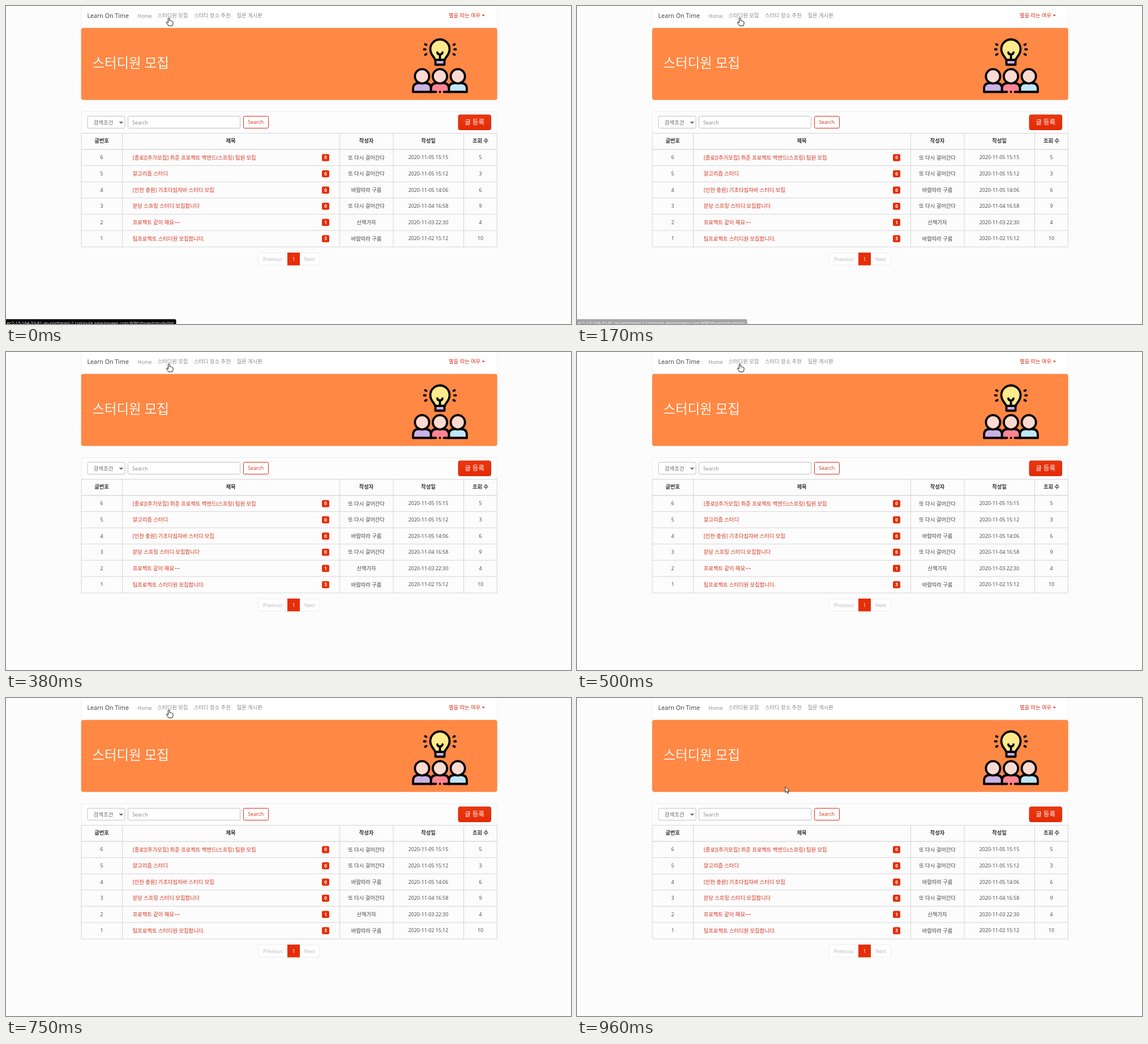
An HTML page for the animation above (1000 ms loop, 998 by 561 pixels).

```html
<!DOCTYPE html>
<html lang="ko">
<head>
<meta charset="utf-8">
<style>
  html, body { margin: 0; width: 100%; height: 100%; overflow: hidden; background: #fcfcfc; }
  svg { display: block; }
  text { font-family: "Open Sans", "Noto Sans CJK KR", "Noto Sans CJK", sans-serif; white-space: pre; }
</style>
</head>
<body>
<svg id="stage" width="998" height="561" viewBox="0 0 998 561">
  <defs>
    <linearGradient id="btn" x2="0" y2="1">
      <stop stop-color="#ea370f"/><stop offset="1" stop-color="#e42b07"/>
    </linearGradient>
  </defs>
  <g id="page"></g>
  <g id="icon" transform="translate(766.5 0)" stroke="#000" stroke-width="3.8" stroke-linecap="round" stroke-linejoin="round">
    <path d="M-8.5 95C-9 90-17 87-17 76A17 17 0 0 1 17 76C17 87 9 90 8.5 95Z" fill="#ffea8c"/>
    <path d="M-8 95H8V103.500H-8Z" fill="#c9b2e6"/>
    <path d="M-4.500 82Q-4 85.500 0 85.500Q4 85.500 4.500 82M0 86V94" fill="none"/>
    <path id="rays" d="M-28 76.500H-25.500M-26 67.500L-24 68.500M-26 86L-24 84.800M28 76.500H25.500M26 67.500L24 68.500M26 86L24 84.800" fill="none"/>
  </g>
  <g id="status">
    <path d="M0 552.500H298Q300.500 552.500 300.500 555V561H0Z" fill="#000"/>
    <text x="1.500" y="562" font-size="7.750" fill="#fff">ec2-15-164-33-81.ap-northeast-2.compute.amazonaws.com:8080/board/study/list</text>
  </g>
  <g id="cursor" stroke="#111" stroke-linejoin="round" fill="#fff">
    <path id="hand" stroke-width="1" d="M-1.300 1.200Q0 -.4 1.300 1.200V5.500Q2.500 4.700 3.500 6Q4.800 5.300 5.600 6.700Q7 6.300 7.300 8V11Q7 13 6 14.700H-.5Q-2 12-4.400 9.200Q-4.300 7.500-2.600 8.300L-1.300 9.400Z"/>
    <path id="arrow" stroke-width=".9" d="M0 0V10.500L2.400 8.300L4 12.100L5.700 11.400L4.100 7.700H7.300Z"/>
  </g>
</svg>
<script>
const RED = '#e62e08', LINK = '#d5301a', LINE = '#d5d5d6', INK = '#444';
const $ = id => document.getElementById(id);

function add(parent, tag, attrs) {
  const el = document.createElementNS('http://www.w3.org/2000/svg', tag);
  for (const k in attrs) el.setAttribute(k, attrs[k]);
  return parent.appendChild(el);
}
const page = $('page'), icon = $('icon');
const box = (x, y, width, height, rx, fill, stroke = 'none') =>
  add(page, 'rect', { x, y, width, height, rx, fill, stroke });
const line = (d, stroke = LINE) => add(page, 'path', { d, stroke, fill: 'none' });

// Places text by its vertical centre.
function label(text, x, cy, { size = /[가-힣]/.test(text) ? 9.3 : 8.75, fill = INK, anchor = 'middle', weight = 400 } = {}) {
  add(page, 'text', { x, y: cy + size * .37, 'font-size': size, fill, 'text-anchor': anchor, 'font-weight': weight })
    .textContent = text;
}
const left = (text, x, cy, fill, size) => label(text, x, cy, { fill, size, anchor: 'start' });

// Navigation bar
box(133, -5, 734.5, 43.5, 0, '#fff', '#f1f1f1');
left('Learn On Time', 143.5, 17.3, '#373a3c', 10.7);
left('Home', 232.5, 17.3, '#888');
left('스터디원 모집', 267.5, 17, '#888');
left('스터디 장소 추천', 332, 17, '#888');
left('질문 게시판', 407.5, 17, '#888');
left('별을 따는 여우', 782, 17, LINK);
add(page, 'path', { d: 'M840.500 15.500H846L843.250 18.300Z', fill: LINK });

// Banner
box(132.7, 38.8, 735, 127, 4, '#ff8845');
left('스터디원 모집', 152.5, 100, '#fff7f0', 23.4);

// Search bar
box(133, 186.5, 734.5, 38, 2, '#fdfdfd', '#ececec');
box(144, 194.5, 66, 21, 2, '#fff', '#c2c2c4');
left('검색조건', 154.5, 205, '#666', 9.5);
add(page, 'path', { d: 'M200.800 204L203.300 206.500L205.800 204', fill: 'none', stroke: '#333', 'stroke-width': 1.4 });
box(215.5, 194.5, 198, 21, 2, '#fff', '#c2c2c4');
left('Search', 223, 205.3, '#888');
box(419.5, 194.5, 44, 21, 2, '#fff', LINK);
label('Search', 441.3, 205, { fill: LINK });
box(799, 192, 57.5, 26.5, 3, 'url(#btn)', '#d42a0a');
label('글 등록', 827.7, 205, { size: 11.6, fill: '#fff' });

// Table
const cols = [169, 397, 636.5, 746, 838];
['글번호', '제목', '작성자', '작성일', '조회 수'].forEach((head, i) =>
  label(head, cols[i], 238, { fill: '#333', weight: 700 }));
[133, 205.5, 589.5, 684, 808.5, 867.5].forEach(x => line(`M${x} 224.500V425`));
line('M133 224.500H867.500');

const again = '또 다시 걸어간다', breeze = '바람따라 구름';
[
  ['[종로][추가모집] 취준 프로젝트 백엔드(스프링) 팀원 모집', 0, again, '05 15:15', 5],
  ['알고리즘 스터디', 0, again, '05 15:12', 3],
  ['[인천 충원] 기초다짐자바 스터디 모집', 0, breeze, '05 14:06', 6],
  ['분당 스프링 스터디 모집합니다', 0, again, '04 16:58', 9],
  ['프로젝트 같이 해요~~', 1, '산책가자', '03 22:30', 4],
  ['팀프로젝트 스터디원 모집합니다.', 3, breeze, '02 15:12', 10]
].forEach(([title, replies, author, date, views], i) => {
  const y = 267.2 + 28.6 * i;
  line(`M133 ${y - 14.2}H867.500`, i ? LINE : '#c9c9cb');
  label(String(6 - i), cols[0], y);
  left(title, 223.7, y, LINK);
  box(558, y - 6, 13, 12.5, 2.5, RED);
  label(String(replies), 564.5, y + .2, { size: 8, fill: '#fff', weight: 700 });
  label(author, cols[2], y);
  label('2020-11-' + date, cols[3], y);
  label(String(views), cols[4], y);
});
line('M133 425H867.500');

// Pagination
box(445.5, 435.5, 108.5, 21.5, 2, '#fff', '#ececec');
box(497, 435, 22, 22.5, 0, RED);
label('Previous', 471.5, 446.5, { fill: '#b5b5b5' });
label('1', 508, 446.5, { fill: '#fff' });
label('Next', 536.3, 446.5, { fill: '#b5b5b5' });

// Team under the light bulb
[[-31.6, '#c9b2e6'], [31.6, '#bfe7fb'], [0, '#ff8494']].forEach(([x, fill]) => {
  add(icon, 'path', { d: `M${x - 15.8} 151.500V146Q${x - 15.8} 136 ${x - 6} 136H${x + 6}Q${x + 15.8} 136 ${x + 15.8} 146V151.500`, fill });
  add(icon, 'circle', { cx: x, cy: 124, r: 12.6, fill: '#fcdad2' });
});
add(icon, 'path', { d: 'M-47.400 151.500H-7M0 151.500H.1M7 151.500H47.400' });

const clamp = v => Math.min(1, Math.max(0, v));

function draw(now) {
  const step = Math.floor((now % 1000 + 4) * 24 / 1000);
  const t = step * 1000 / 24;
  $('status').setAttribute('opacity', clamp(1 - (t - 20) / 225));

  const p = clamp((step - 18) / 5), ease = p * p * (3 - 2 * p);
  const x = 287.7 + 80.3 * ease, y = 20.3 + 136 * ease;
  $('cursor').setAttribute('transform', `translate(${x} ${y})`);
  const onLink = y < 26;
  $('hand').style.display = onLink ? '' : 'none';
  $('arrow').style.display = onLink ? 'none' : '';
}

let start;
function tick(now) {
  start ??= now;
  draw(now - start);
  requestAnimationFrame(tick);
}
draw(0);
requestAnimationFrame(tick);
</script>
</body>
</html>
```
